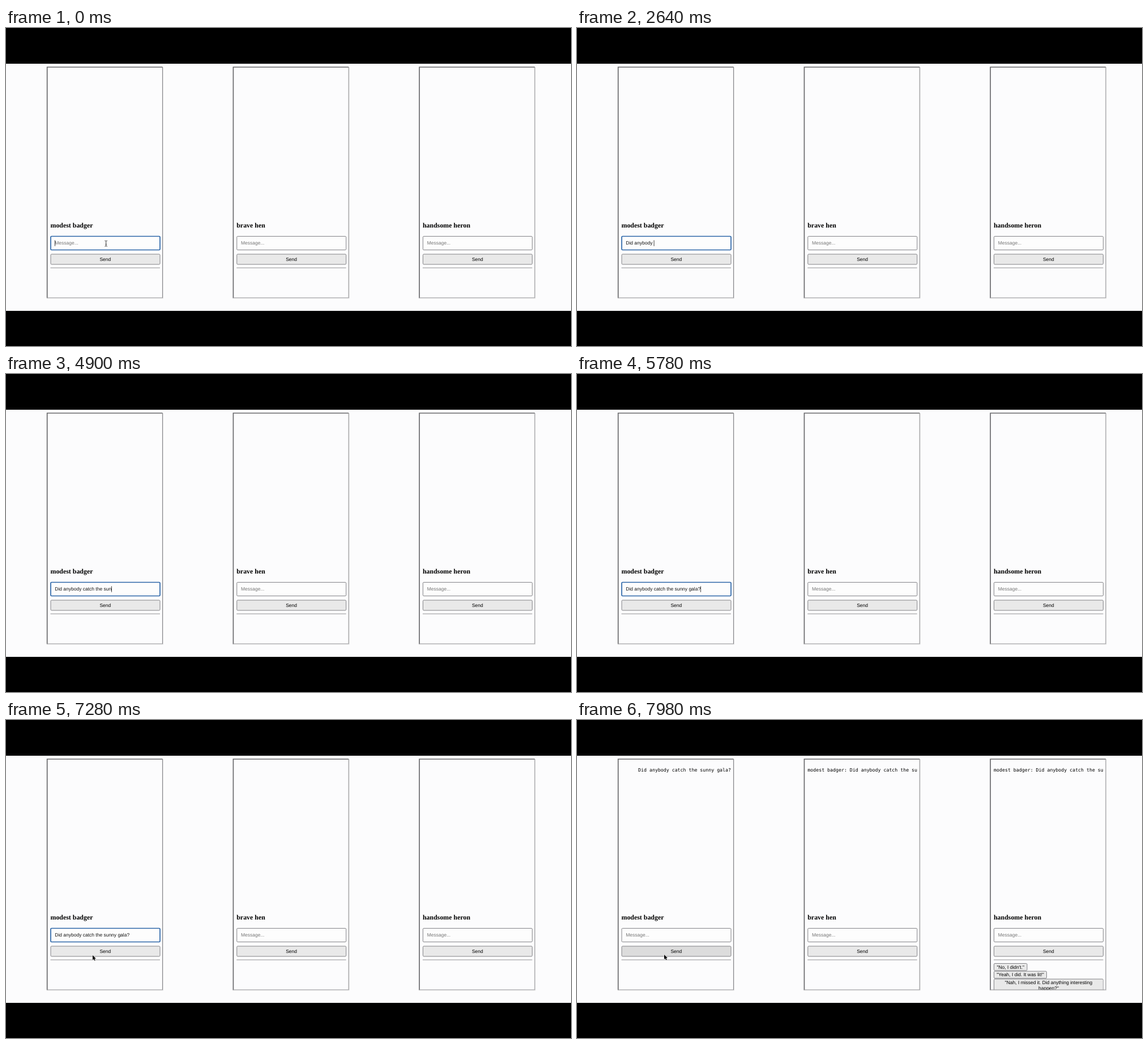
Recreate the animation shown at these times as an HTML page. Size 998 by 561 pixels, loop 8 s.

```html
<!DOCTYPE html>
<html lang="en">
<head>
<meta charset="utf-8">
<title>Chat panels</title>
<style>
html, body { margin: 0; width: 100%; height: 100%; overflow: hidden; background: #000; }
svg { display: block; width: 998px; height: 561px; }
text { white-space: pre; text-rendering: geometricPrecision; }
.name { font: bold 11.9px "Liberation Serif", "Times New Roman", serif; }
.ui { font: 8.48px "Liberation Sans", Arial, sans-serif; }
.mono { font: 8.26px "DejaVu Sans Mono", monospace; }
.mid { text-anchor: middle; }
.end { text-anchor: end; }
</style>
</head>
<body>
<svg id="stage" viewBox="0 0 998 561" xmlns="http://www.w3.org/2000/svg">
  <rect width="998" height="561" fill="#000"/>
  <rect y="63" width="998" height="436" fill="#fcfcfd"/>
</svg>
<script>
const LOOP = 8000;
const MSG = 'Did anybody catch the sunny gala?';
const NAMES = ['modest badger', 'brave hen', 'handsome heron'];
const REPLIES = [
  { y: 429.5, w: 58.5, h: 12.5, lines: ['"No, I didn\'t."'] },
  { y: 443.2, w: 93, h: 12.5, lines: ['"Yeah, I did. It was lit!"'] },
  { y: 457, w: 193, h: 22, lines: ['"Nah, I missed it. Did anything interesting', 'happen?"'] }
];
// time of each keystroke
const KEYS = [720, 820, 900, 980, 1100, 1220, 1400, 1540, 1680, 1840, 2240,
  2380, 2700, 3060, 3520, 3800, 3920, 4040, 4160, 4280, 4400, 4520, 4640,
  4740, 4860, 4960, 5060, 5160, 5320, 5400, 5480, 5540, 5620];
const SENT = 7460, RECEIVED = 7520, SUGGESTED = 7760;
const MOVE = 6620, ARROW = 6680, HOVER = 6690, PRESS = 7270;
// pointer path: time, x, y
const PATH = [[6620, 174, 381], [6760, 156, 417], [6860, 156, 417],
  [7100, 153, 415.5], [7280, 153, 415], [7460, 153.5, 414.5], [7700, 154, 414]];

const stage = document.getElementById('stage');

function el(tag, attrs, parent = stage, content) {
  const node = document.createElementNS('http://www.w3.org/2000/svg', tag);
  for (const k in attrs) node.setAttribute(k, attrs[k]);
  if (content) node.textContent = content;
  parent.appendChild(node);
  return node;
}

const show = (node, on) => node.setAttribute('visibility', on ? 'visible' : 'hidden');

function box(parent, x, y, w, h, fill) {
  return el('rect', { x, y, width: w, height: h, rx: 1.6, fill, stroke: '#77777b', 'stroke-width': 0.9 }, parent);
}

const clip = el('clipPath', { id: 'inner' });
el('rect', { x: 6, y: 69, width: 194.2, height: 407.5 }, clip);

function panel(name, i) {
  const g = el('g', { transform: `translate(${72 + 328.75 * i} 0)` });
  const inner = el('g', { 'clip-path': 'url(#inner)' }, g);
  const line = el('text', i
    ? { class: 'mono', x: 6.6, y: 91 }
    : { class: 'mono end', x: 200, y: 91 }, inner, i ? `${NAMES[0]}: ${MSG}` : MSG);
  el('text', { class: 'name', x: 6.5, y: 352.3 }, g, name);
  const field = box(g, 7, 367.5, 193, 24, '#fdfdfd');
  const text = el('text', { class: 'ui', x: 14.3, y: 382.4 }, g, 'Message...');
  text.setAttribute('fill', '#757575');
  const send = box(g, 7, 399, 193, 18, '#e9e9e9');
  el('text', { class: 'ui mid', x: 103.3, y: 410.6 }, g, 'Send');
  el('rect', { x: 6.5, y: 422.6, width: 193.5, height: 1, fill: '#909092' }, g);
  const replies = el('g', { 'clip-path': 'url(#inner)' }, g);
  if (i === 2) REPLIES.forEach(r => {
    box(replies, 7, r.y, r.w, r.h, '#e9e9e9');
    r.lines.forEach((s, n) =>
      el('text', { class: 'ui mid', x: 7 + r.w / 2, y: r.y + 9.2 + n * 9.7 }, replies, s));
  });
  el('path', { d: 'M.7 476.5V69H204.5', fill: 'none', stroke: '#69696c', 'stroke-width': 1.7 }, g);
  el('path', { d: 'M204.5 69V476H0', fill: 'none', stroke: '#858588', 'stroke-width': 1.1 }, g);
  el('path', { d: 'M205.5 69V477H0', fill: 'none', stroke: '#dededf', 'stroke-width': 0.9 }, g);
  return { line, field, text, send, replies };
}

const panels = NAMES.map(panel);
const caret = el('rect', { y: 374.4, width: 0.8, height: 10.4, fill: '#111' });
const beam = el('path', {
  d: 'M-2.2 -5Q-.3 -5 0 -4Q.3 -5 2.2 -5M0 -4V4M-2.2 5Q-.3 5 0 4Q.3 5 2.2 5M-1 1.5H1',
  fill: 'none', stroke: '#222', 'stroke-width': 0.9
});
const arrow = el('path', {
  d: 'M0 0V8.2L1.9 6.5L3.2 9.6L4.7 9L3.4 6H5.9Z',
  fill: '#000', stroke: '#fff', 'stroke-width': 0.7, 'paint-order': 'stroke'
});

function pointer(t) {
  let a = PATH[0];
  if (t < a[0]) return [176.7, 380.2];
  for (const b of PATH) {
    if (t < b[0]) {
      const u = (t - a[0]) / (b[0] - a[0]), e = u * u * (3 - 2 * u);
      return [a[1] + (b[1] - a[1]) * e, a[2] + (b[2] - a[2]) * e];
    }
    a = b;
  }
  return [a[1], a[2]];
}

function draw(t) {
  const sent = t >= SENT;
  const count = sent ? 0 : KEYS.filter(k => k <= t).length;
  const { field, text, send } = panels[0];

  text.textContent = count ? MSG.slice(0, count) : 'Message...';
  text.setAttribute('fill', count ? '#111' : '#757575');
  field.setAttribute('stroke', sent ? '#77777b' : '#2c66a8');
  field.setAttribute('stroke-width', sent ? 0.9 : 1.7);

  // the caret restarts its blink with every keystroke
  const since = count ? t - KEYS[count - 1] : t + 80;
  caret.setAttribute('x', 86.2 + (count ? text.getComputedTextLength() : 0));
  show(caret, !sent && since % 1000 < 500);

  const hover = t >= HOVER && (t < PRESS || sent);
  send.setAttribute('fill', hover ? '#dcdcdc' : '#e9e9e9');

  const at = `translate(${pointer(t).join(' ')})`;
  beam.setAttribute('transform', at);
  arrow.setAttribute('transform', at);
  show(beam, t < KEYS[0] || (t >= MOVE && t < ARROW));
  show(arrow, t >= ARROW);

  panels.forEach((p, i) => show(p.line, t >= (i ? RECEIVED : SENT)));
  show(panels[2].replies, t >= SUGGESTED);
}

function tick() {
  draw(performance.now() % LOOP);
  requestAnimationFrame(tick);
}
tick();
</script>
</body>
</html>
```
